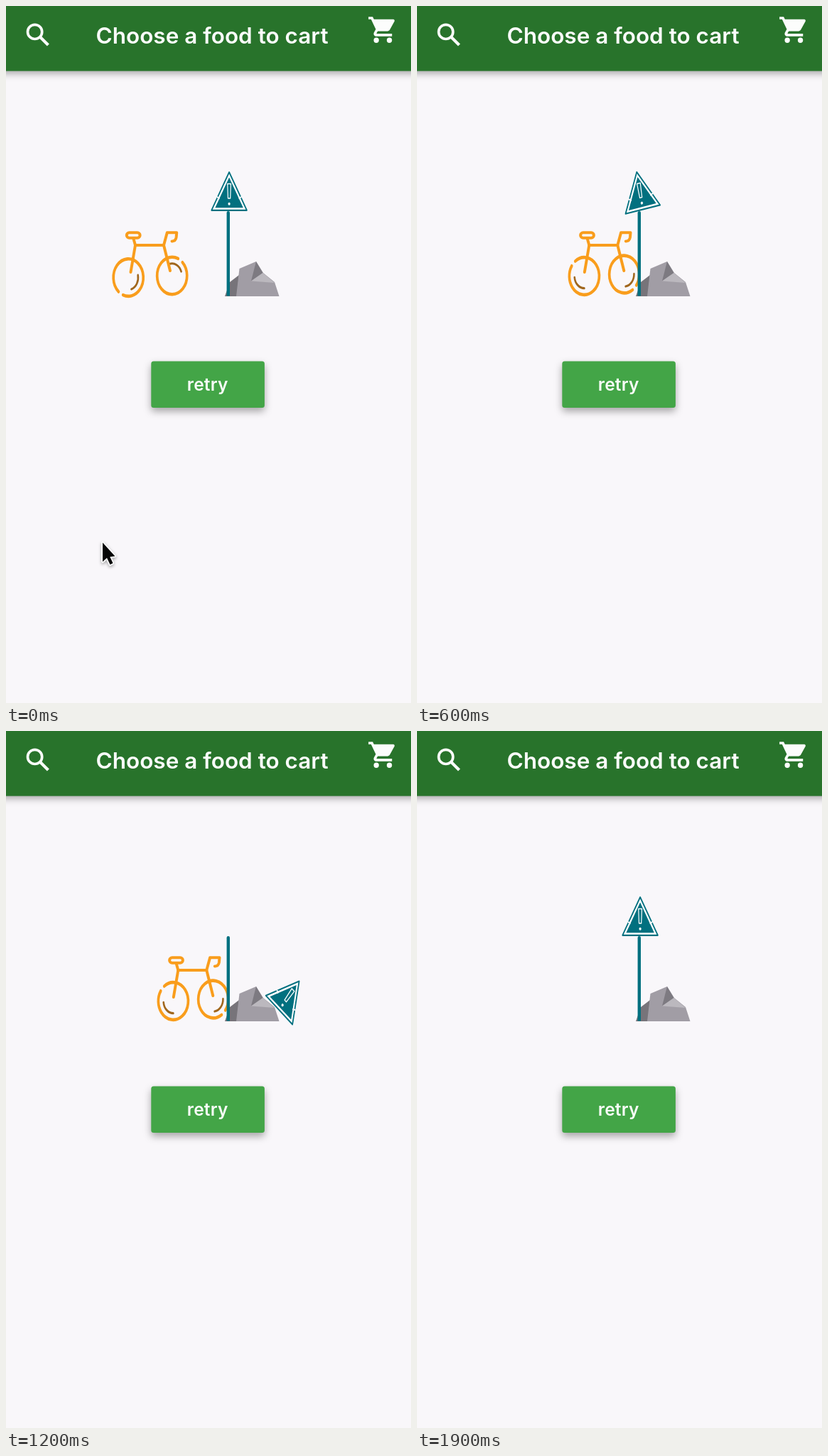
An HTML page with a canvas for the animation above (2000 ms loop, 570x982 px).

```html
<!DOCTYPE html>
<html lang="en">
<head>
<meta charset="utf-8">
<title>Network error</title>
<style>
  html, body { margin: 0; width: 100%; height: 100%; overflow: hidden; background: #f9f7fa; }
  canvas { display: block; }
</style>
</head>
<body>
<canvas id="stage" width="570" height="982"></canvas>
<script>
const ctx = document.getElementById('stage').getContext('2d');
const LOOP = 2000, STEP = 100;
const SQUASH = 0.8; // the illustration is narrowed horizontally
const TEAL = '#02707f', ORANGE = '#f99d1c', BROWN = '#a0661c';
const HIT = 260;    // the bike reaches the pole
const rad = deg => deg * Math.PI / 180;

const cartIcon = new Path2D('M7 18a2 2 0 1 0 0 4a2 2 0 1 0 0-4zM17 18a2 2 0 1 0 0 4a2 2 0 1 0 0-4z' +
  'M1 2v2h2l3.6 7.6-1.35 2.4C4.5 15.4 5.5 17 7 17h12v-2H7.4c-.2 0-.3-.2-.2-.4l.9-1.6h7.45' +
  'c.75 0 1.4-.4 1.75-1l3.6-6.5C21.2 4.8 20.7 4 20 4H5.2l-.95-2z');

// Sign keyframes: time, centre x, centre y, angle
const signKeys = [
  [0, 314.1, 269.9, 0],
  [HIT, 314.1, 269.9, 0],
  [600, 315, 269, -11.5],
  [1000, 360.3, 374, -29],
  [1200, 393.8, 379.6, 41],
  [1300, 400.4, 393.8, 56],
  [1899, 400.4, 393.8, 56]
];

function signPose(t) {
  if (t >= 1900) return signKeys[0].slice(1);
  const i = signKeys.findIndex(k => k[0] > t);
  const a = signKeys[i - 1], b = signKeys[i];
  const u = (t - a[0]) / (b[0] - a[0]);
  const falling = a[0] === 600;
  return [1, 2, 3].map(j => a[j] + (b[j] - a[j]) * (falling && j === 2 ? Math.pow(u, 1.5) : u));
}

function poly(points, fill) {
  ctx.beginPath();
  points.forEach(([x, y]) => ctx.lineTo(x, y));
  ctx.closePath();
  if (fill) {
    ctx.fillStyle = fill;
    ctx.fill();
  }
}

function line(...points) {
  ctx.beginPath();
  points.forEach(([x, y]) => ctx.lineTo(x, y));
  ctx.stroke();
}

function label(text, x, y, font, color, spacing) {
  ctx.font = font;
  ctx.letterSpacing = spacing + 'px';
  ctx.textAlign = 'center';
  ctx.fillStyle = color;
  ctx.fillText(text, x + spacing / 2, y);
}

function shadow(color, blur, dy) {
  ctx.shadowColor = color;
  ctx.shadowBlur = blur;
  ctx.shadowOffsetY = dy;
}

function header() {
  ctx.save();
  shadow('rgba(0,0,0,.34)', 10, 3);
  ctx.fillStyle = '#28732b';
  ctx.fillRect(-20, -20, 610, 111.6);
  ctx.restore();

  ctx.strokeStyle = '#fcfdfc';
  ctx.lineWidth = 3.7;
  ctx.lineCap = 'butt';
  ctx.beginPath();
  ctx.arc(40.6, 36.4, 10.1, 0, 7);
  ctx.stroke();
  ctx.lineWidth = 4.2;
  line([47.3, 43], [59.4, 55]);

  ctx.save();
  ctx.translate(508.3, 11.5);
  ctx.scale(1.84, 1.84);
  ctx.fillStyle = '#fcfdfc';
  ctx.fill(cartIcon);
  ctx.restore();

  label('Choose a food to cart', 290, 52.5, '600 31.5px Inter, Roboto, sans-serif', '#fcfdfc', 0);
}

function button() {
  ctx.save();
  shadow('rgba(0,0,0,.34)', 11, 5);
  ctx.fillStyle = '#43a547';
  ctx.beginPath();
  ctx.roundRect(204.3, 500.6, 159.6, 65.4, 3.5);
  ctx.fill();
  ctx.restore();
  label('retry', 283.6, 541.5, '600 24.5px Inter, Roboto, sans-serif', '#f8fcf8', 0.2);
}

// gap: middle of the break in the rim; glint: start of the inner arc
function wheel(x, y, turn, gap, glint) {
  ctx.save();
  ctx.translate(x, y);
  ctx.scale(SQUASH, 1);
  ctx.rotate(rad(turn));
  ctx.lineCap = 'round';
  ctx.strokeStyle = ORANGE;
  ctx.lineWidth = 4.6;
  ctx.beginPath();
  ctx.arc(0, 0, 26.3, rad(gap + 10), rad(gap + 350));
  ctx.stroke();
  ctx.strokeStyle = BROWN;
  ctx.lineWidth = 3.2;
  ctx.beginPath();
  ctx.arc(0, 0, 17.2, rad(glint), rad(glint + 84));
  ctx.stroke();
  ctx.restore();
}

function bike(t) {
  const u = Math.min(t, HIT) / HIT;
  const turn = 462 * u;
  wheel(172.2 + 63.2 * u, 382.6 - 2.1 * u, turn, 121, -12);
  wheel(233.7 + 58 * u, 380 - 2 * u, turn, -56, -104);

  ctx.save();
  ctx.translate(60.3 * u, 0);
  ctx.strokeStyle = ORANGE;
  ctx.lineWidth = 4;
  ctx.lineCap = ctx.lineJoin = 'round';
  ctx.beginPath();
  ctx.roundRect(169.8, 319.3, 18.8, 7.4, 3.7);
  ctx.stroke();
  line([179.5, 328], [182, 337], [175.5, 375]);
  line([182, 337], [222, 337]);
  ctx.beginPath();
  ctx.moveTo(231, 373);
  ctx.lineTo(222, 337);
  ctx.lineTo(226.8, 319.3);
  ctx.lineTo(240.2, 319.3);
  ctx.lineTo(239.6, 326);
  ctx.quadraticCurveTo(238.6, 331.6, 233.5, 331.4);
  ctx.stroke();
  ctx.restore();
}

function rock() {
  poly([[308, 409], [315, 389], [328, 379], [325, 409]], '#77747a');
  poly([[324, 409], [328.5, 370], [352, 360], [362, 376], [378, 389], [384.5, 409]], '#a19da5');
  poly([[352, 360], [361.5, 376], [345, 387.5]], '#7d7a81');
  poly([[361.5, 376], [378, 390], [345, 387.5]], '#bbb8be');
}

function pole() {
  ctx.fillStyle = TEAL;
  ctx.beginPath();
  ctx.roundRect(310.6, 289, 4.4, 119.5, [2.2, 2.2, 0, 0]);
  ctx.fill();
}

function triangle(r) {
  poly([-90, 30, 150].map(a => [r * Math.cos(rad(a)), r * Math.sin(rad(a))]));
}

function sign(x, y, angle) {
  ctx.save();
  ctx.translate(x, y);
  ctx.scale(SQUASH, 1);
  ctx.rotate(rad(angle));
  ctx.lineJoin = 'round';
  ctx.lineCap = 'butt';

  triangle(35.8);
  ctx.fillStyle = '#fff';
  ctx.fill();
  ctx.strokeStyle = TEAL;
  ctx.lineWidth = 2.2;
  ctx.stroke();
  triangle(28.5);
  ctx.fillStyle = TEAL;
  ctx.fill();

  // Small breaks in the border
  ctx.strokeStyle = '#fff';
  ctx.lineWidth = 2;
  line([-21.5, -1], [-17, 1.6]);
  line([21.5, -1], [17, 1.6]);

  ctx.lineWidth = 1.5;
  poly([[-3, -19.5], [3, -19.5], [2, 1], [-2, 1]]);
  ctx.stroke();
  ctx.fillStyle = '#fff';
  ctx.beginPath();
  ctx.arc(0, 8.8, 2, 0, 7);
  ctx.fill();
  ctx.restore();
}

function message(alpha) {
  ctx.save();
  ctx.globalAlpha = alpha;
  ctx.translate(303.6, 259);
  ctx.scale(SQUASH, 1);
  label('Network Error', 0, 0, '700 44px Lato, Carlito, sans-serif', '#f01519', 3.4);
  ctx.restore();
}

function cursor() {
  ctx.save();
  poly([[136, 756], [136, 783], [142, 777.5], [146.5, 787], [150.5, 785], [146.3, 776], [153.5, 775.2]]);
  shadow('rgba(0,0,0,.35)', 4, 2);
  ctx.strokeStyle = '#fff';
  ctx.lineWidth = 3.4;
  ctx.lineJoin = 'round';
  ctx.stroke();
  ctx.shadowColor = 'transparent';
  ctx.fillStyle = '#060606';
  ctx.fill();
  ctx.restore();
}

function draw(t) {
  ctx.fillStyle = '#f9f7fa';
  ctx.fillRect(0, 0, 570, 982);
  header();
  button();
  if (t < 1900) bike(t);
  rock();
  pole();
  sign(...signPose(t));
  if (t > 1300 && t < 1900) message(Math.min(1, (t - 1300) / 200));
  if (t < 100) cursor();
}

const start = performance.now();
function tick() {
  const t = (performance.now() - start) % LOOP;
  draw(Math.floor(t / STEP) * STEP);
  requestAnimationFrame(tick);
}
tick();
</script>
</body>
</html>
```
